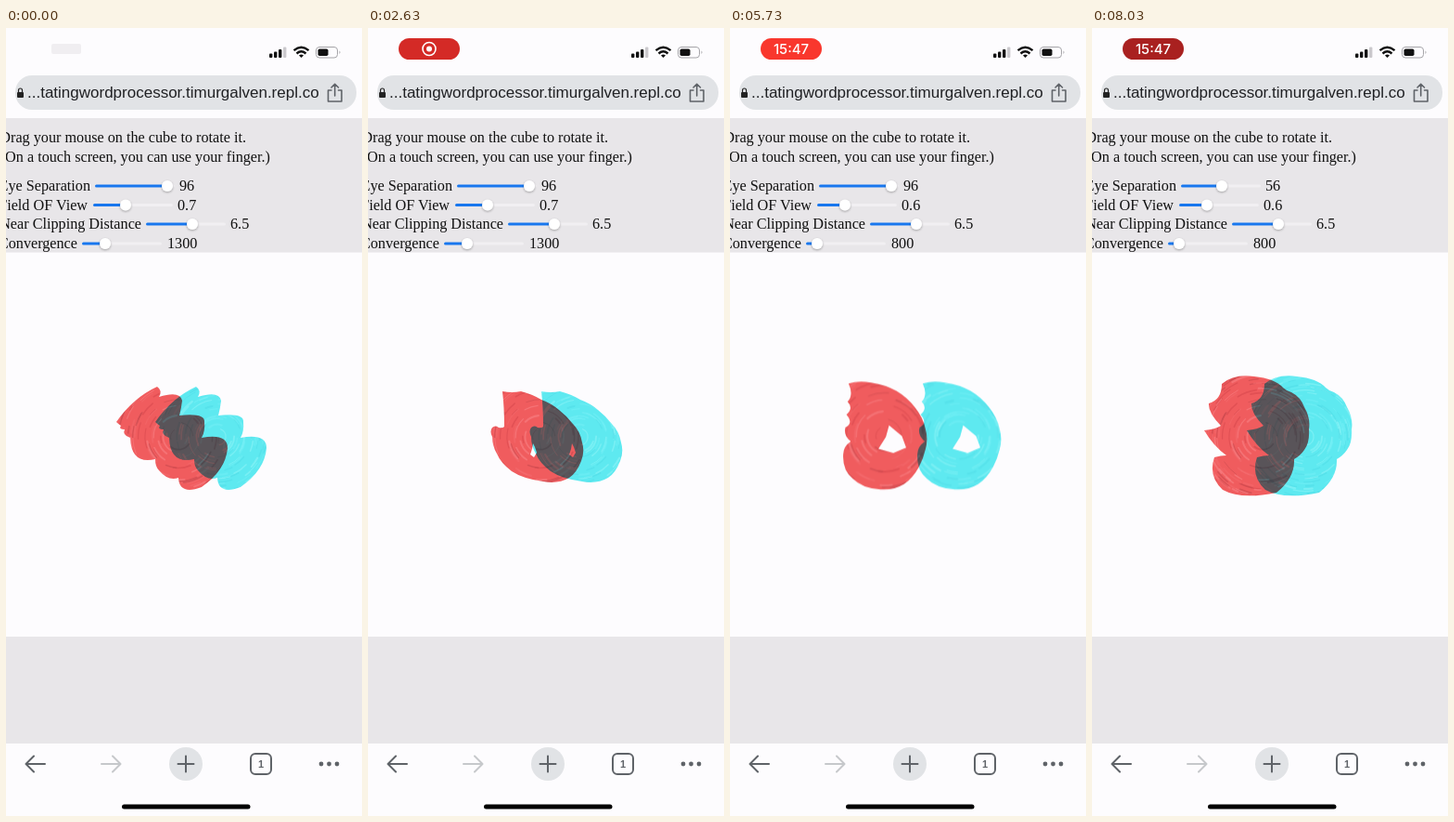
Recreate the animation shown at these times as an HTML page. Size 384 by 848 pixels, loop 8060 ms.

```html
<!DOCTYPE html>
<html lang="en">
<head>
<meta charset="utf-8">
<title>Anaglyph viewer</title>
<style>
@property --dx { syntax: "<length>"; inherits: true; initial-value: 42px; }
html, body { margin: 0; width: 100%; height: 100%; overflow: hidden; background: #fdfcfe; }
svg { display: block; }
.serif { font: 16.2px "Liberation Serif", serif; fill: #111; }
.sans { font-family: "Liberation Sans", sans-serif; }
.end { text-anchor: end; }
.icon { fill: none; stroke: #5f6368; stroke-width: 2; stroke-linecap: round; stroke-linejoin: round; }
.pale { stroke: #c6c8cb; }

.scene { isolation: isolate; animation: spread 8060ms linear infinite; }
.red { transform: translateX(calc(var(--dx) * -.5)); }
.cyan { transform: translateX(calc(var(--dx) * .5)); mix-blend-mode: multiply; }
.shape {
  fill-rule: evenodd;
  transform-origin: 207px 440px;
  animation: turn 8060ms linear infinite, zoom 8060ms linear infinite;
}
.hint { animation: hint 8060ms linear infinite; }
.badge { animation: badge 8060ms linear infinite; }
.rec { animation: rec 8060ms step-end infinite; }
.clock { animation: clock 8060ms step-end infinite; }

/* Distance between the two eye views */
@keyframes spread {
  0%, 53.34% { --dx: 42px; }
  53.35%, 57.07% { --dx: 48px; }
  65.76%, 72.33% { --dx: 80px; }
  78.16%, 100% { --dx: 46px; }
}
@keyframes zoom {
  0%, 53.34% { transform: scale(1); }
  53.35%, 78.78% { transform: translateY(-1px) scale(1.15); }
  85.24%, 100% { transform: scale(1); }
}
@keyframes turn {
  0% { d: path("M140 424 Q158 398 184 386 Q190 390 186 397 Q209 390 211 401 Q210 410 208 417 Q236 414 235 424 Q236 434 232 441 Q260 436 260 452 Q258 476 232 494 Q208 503 207 484 Q196 488 186 476 Q182 472 182 464 Q156 470 155 441 Q146 438 149 432 Q142 432 145 428 Q142 426 140 424 Z M200 440 L200 440 L200 440 L200 440 L200 440 L200 440 Z"); }
  13.28% { d: path("M153 396 Q168 386 188 386 Q214 386 222 399 Q224 404 223 407 Q237 410 236 424 Q236 430 235 432 Q244 440 239 452 Q246 458 245 470 Q242 497 211 498 Q176 499 179 481 Q164 474 170 464 Q156 454 166 446 Q156 440 162 431 Q150 424 157 416 Q152 412 156 406 Q152 402 153 396 Z M200 440 L200 440 L200 440 L200 440 L200 440 L200 440 Z"); }
  32.63% { d: path("M166 391 Q176 393 186 391 Q198 394 208 400 Q219 404 227 411 Q236 418 242 426 Q250 434 252 446 Q255 456 251 466 Q246 479 238 484 Q226 491 210 488 Q188 485 176 477 Q164 468 160 458 Q155 450 155 440 Q152 434 155 430 Q158 427 162 430 Q166 431 168 429 Q168 408 166 391 Z M199 447 L198 453 L196 459 L200 462 L203 457 L201 451 Z"); }
  46.28%, 78.78% { d: path("M173 391 Q182 388 194 390 Q208 392 218 398 Q228 404 235 413 Q243 423 245 433 Q248 443 245 453 Q243 462 239 469 Q233 480 225 485 Q215 491 203 490 Q186 489 177 480 Q167 472 168 457 Q168 450 175 445 Q168 440 170 432 Q178 428 171 420 Q178 414 172 408 Q178 402 173 391 Z M211 430 L208 441 L201 452 L215 456 L227 451 L223 440 Z"); }
  85.24% { d: path("M171 383 Q182 381 194 385 Q211 387 221 393 Q234 399 242 409 Q251 419 253 431 Q256 443 252 455 Q249 467 241 476 Q233 487 221 490 Q207 494 194 492 Q176 489 168 478 Q160 467 161 452 Q162 434 174 427 Q180 424 182 421 Q172 418 167 410 Q174 408 166 402 Q176 398 171 383 Z M206 422 L211 438 L202 458 L214 464 L228 462 L221 441 Z"); }
  99.63%, 100% { d: path("M163 383 Q176 372 198 375 Q220 377 229 387 Q232 390 238 392 Q248 397 252 408 Q259 420 257 432 Q258 446 252 454 Q248 460 241 464 Q242 484 222 500 Q184 508 164 497 Q148 482 155 462 Q162 460 168 460 Q154 450 144 433 Q156 432 162 428 Q148 414 149 404 Q163 400 163 383 Q163 383 163 383 Z M215 440 L215 440 L215 440 L215 440 L215 440 L215 440 Z"); }
}
@keyframes hint { 0%, 4% { opacity: 1; } 7%, 100% { opacity: 0; } }
@keyframes badge {
  0%, 4% { opacity: 0; fill: #d42a26; }
  8% { opacity: 1; }
  13.28%, 32.63% { fill: #d42a26; }
  46.28%, 71.1% { fill: #f9372d; }
  85.24% { fill: #d92e26; }
  99.63%, 100% { opacity: 1; fill: #a92120; }
}
@keyframes rec { 0% { opacity: 0; } 6% { opacity: 1; } 39.7%, 100% { opacity: 0; } }
@keyframes clock { 0% { opacity: 0; } 39.7%, 100% { opacity: 1; } }
</style>
</head>
<body>
<svg width="384" height="848" viewBox="0 0 384 848">
  <defs>
    <pattern id="redPaint" width="384" height="848" patternUnits="userSpaceOnUse">
      <rect width="384" height="848" fill="#f05c5e"/>
    </pattern>
    <pattern id="cyanPaint" width="384" height="848" patternUnits="userSpaceOnUse">
      <rect width="384" height="848" fill="#5ee9f0"/>
    </pattern>
    <filter id="soft" x="-50%" y="-50%" width="200%" height="200%">
      <feDropShadow dx="0" dy="1" stdDeviation="1.2" flood-color="#333" flood-opacity=".4"/>
    </filter>
  </defs>

  <rect width="384" height="848" fill="#fdfcfe"/>
  <rect y="97" width="384" height="144.5" fill="#e8e6e9"/>
  <rect y="655" width="384" height="115" fill="#e8e6e9"/>

  <!-- Status bar -->
  <rect class="hint" x="49" y="17" width="32" height="11" rx="2" fill="#f0eef1"/>
  <rect class="badge" x="33" y="11" width="66" height="23" rx="11.5"/>
  <g class="rec" fill="none" stroke="#fff" stroke-width="1.6">
    <circle cx="66" cy="22.5" r="7"/>
    <circle cx="66" cy="22.5" r="3" fill="#fff" stroke="none"/>
  </g>
  <text class="clock" x="66" y="28" text-anchor="middle" fill="#fff" font-family="Inter, sans-serif" font-size="15" font-weight="500">15:47</text>
  <g fill="#111">
    <rect x="284" y="27.5" width="3.4" height="4.5" rx="1"/>
    <rect x="289" y="25.5" width="3.4" height="6.5" rx="1"/>
    <rect x="294" y="23" width="3.4" height="9" rx="1"/>
    <rect x="299" y="20.5" width="3.4" height="11.5" rx="1" fill="#cbc9cd"/>
  </g>
  <g fill="none" stroke="#111" stroke-width="2.4">
    <path d="M310.5 24.2 Q318.5 17.5 326.5 24.2"/>
    <path d="M313.5 27.5 Q318.5 23.2 323.5 27.5"/>
    <path d="M316 29.4 Q318.5 27.4 321 29.4 L318.5 32 Z" fill="#111" stroke="none"/>
  </g>
  <rect x="334.5" y="20.5" width="23" height="11.5" rx="3.5" fill="none" stroke="#a5a4a8"/>
  <rect x="336.5" y="22.5" width="11" height="7.5" rx="1.8" fill="#111"/>
  <path d="M359.5 24.5 Q361.5 26.2 359.5 28 Z" fill="#a5a4a8"/>

  <!-- Address bar -->
  <rect x="10" y="51" width="368" height="37" rx="18" fill="#e1e3e6"/>
  <rect x="12" y="69" width="7" height="6" rx="1" fill="#222"/>
  <path d="M13.5 69 V67 A2 2 0 0 1 17.5 67 V69" fill="none" stroke="#222" stroke-width="1.2"/>
  <text class="sans" x="23" y="75" font-size="17" fill="#202124">...tatingwordprocessor.timurgalven.repl.co</text>
  <path class="icon" style="stroke-width:1.6" d="M351 67 H347.5 V79 H362 V67 H358.5 M354.7 73 V60.5 M351 64 L354.7 60.3 L358.5 64"/>

  <text class="serif end" x="259" y="123">Drag your mouse on the cube to rotate it.</text>
  <text class="serif end" x="285" y="144">(On a touch screen, you can use your finger.)</text>
  <g id="panel"></g>

  <g class="scene">
    <g class="red"><path class="shape" fill="url(#redPaint)"/></g>
    <g class="cyan"><path class="shape" fill="url(#cyanPaint)"/></g>
  </g>

  <!-- Toolbar -->
  <path class="icon" d="M42 792 H22 M30 783.5 L21.5 792 L30 800.5"/>
  <path class="icon pale" d="M103 792 H123 M115 783.5 L123.5 792 L115 800.5"/>
  <circle cx="194" cy="792" r="18" fill="#e1e3e6"/>
  <path class="icon" d="M185.5 792 H202.5 M194 783.5 V800.5"/>
  <rect class="icon" x="264" y="781" width="22" height="22" rx="5"/>
  <text class="sans" x="275" y="796" text-anchor="middle" font-size="11" font-weight="700" fill="#5f6368">1</text>
  <g fill="#5f6368">
    <circle cx="340" cy="792" r="2.4"/><circle cx="348.5" cy="792" r="2.4"/><circle cx="357" cy="792" r="2.4"/>
  </g>
  <rect x="125" y="835.5" width="138.5" height="5" rx="2.5" fill="#000"/>
</svg>

<script>
const LOOP = 8060;
const start = performance.now();

function add(parent, tag, attrs) {
  const el = document.createElementNS("http://www.w3.org/2000/svg", tag);
  for (const key in attrs) el.setAttribute(key, attrs[key]);
  return parent.appendChild(el);
}

// Crayon strokes curling around the middle of the shape
function paint(id, colors, seed) {
  const pattern = document.getElementById(id);
  const random = () => (seed = (seed * 16807) % 2147483647) / 2147483647;
  for (let i = 0; i < 220; i++) {
    const r = 8 + 66 * Math.sqrt(random());
    const a = random() * 2 * Math.PI;
    const b = a + (6 + 18 * random()) / r;
    const at = v => `${(207 + r * Math.cos(v)).toFixed(1)} ${(440 + r * Math.sin(v)).toFixed(1)}`;
    add(pattern, "path", {
      d: `M${at(a)} A${r} ${r} 0 0 1 ${at(b)}`,
      fill: "none", stroke: colors[i % colors.length], "stroke-width": 0.8 + 1.4 * random(),
      "stroke-linecap": "round", opacity: 0.6
    });
  }
}
paint("redPaint", ["#d8474c", "#f98184", "#f4686a", "#c9484c"], 11);
paint("cyanPaint", ["#8af4f7", "#50dde8", "#70eff5"], 29);

function slider(label, labelEnd, y, trackX, valueX) {
  const panel = document.getElementById("panel");
  add(panel, "text", { class: "serif end", x: labelEnd, y: y + 5 }).textContent = label;
  add(panel, "rect", { x: trackX, y: y - 1.5, width: 86, height: 3, rx: 1.5, fill: "#f1eff2" });
  const fill = add(panel, "rect", { x: trackX, y: y - 1.5, height: 3, rx: 1.5, fill: "#1877ee" });
  const thumb = add(panel, "circle", { cy: y, r: 6, fill: "#fff", filter: "url(#soft)" });
  const value = add(panel, "text", { class: "serif", x: valueX, y: y + 5 });
  return (x, text) => {
    fill.setAttribute("width", x - trackX);
    thumb.setAttribute("cx", x);
    value.textContent = text;
  };
}
const setEye = slider("Eye Separation", 91, 170, 96, 187);
const setView = slider("Field OF View", 88, 190.5, 94, 185);
const setNear = slider("Near Clipping Distance", 146, 211, 151, 242);
const setConvergence = slider("Convergence", 77, 232, 82, 174);
setNear(201, "6.5");

function ramp(t, from, to, a, b) {
  return a + (b - a) * Math.min(1, Math.max(0, (t - from) / (to - from)));
}

function draw(t) {
  const eye = Math.round(ramp(t, 5830, 6300, 96, 56));
  const view = t < 4300 ? 0.7 : 0.6;
  const convergence = Math.round(ramp(t, 4600, 5300, 13, 8)) * 100;
  setEye(140 + (eye - 56) * 0.85, eye);
  setView(124 + (view - 0.6) * 50, view);
  setConvergence(94 + (convergence - 800) * 0.026, convergence);
}

function tick() {
  draw((performance.now() - start) % LOOP);
  requestAnimationFrame(tick);
}
tick();
</script>
</body>
</html>
```
